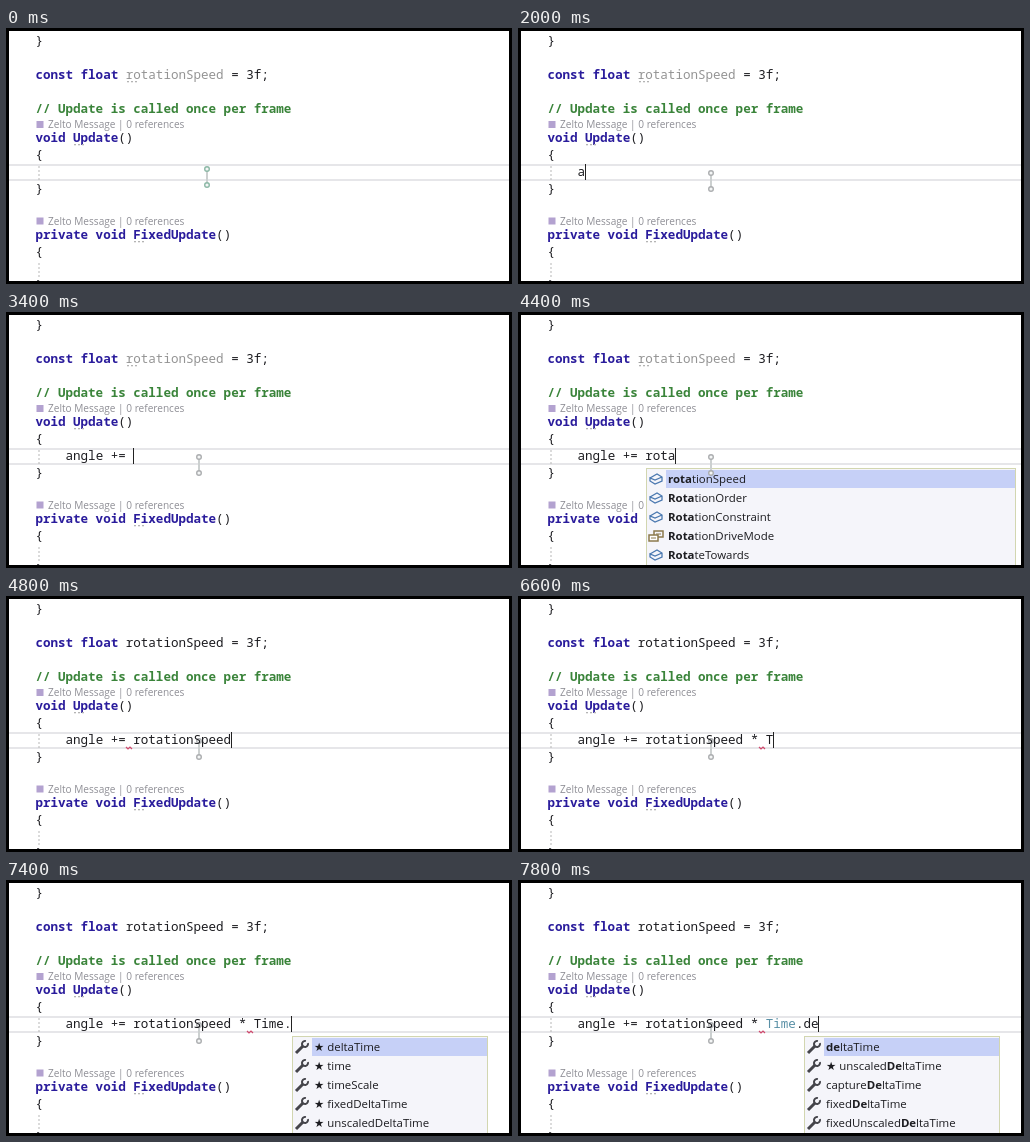
These frames come from a looping animation (506x256 px, 8000 ms). An HTML page with a canvas:

```html
<!DOCTYPE html>
<html lang="en">
<head>
<meta charset="utf-8">
<title>Typing code</title>
<style>
html, body { margin: 0; width: 100%; height: 100%; overflow: hidden; background: #fff; }
canvas { display: block; width: 506px; height: 256px; }
</style>
</head>
<body>
<canvas id="stage" width="506" height="256"></canvas>
<script>
const ctx = document.getElementById('stage').getContext('2d');
const LOOP = 8000, TICK = 200;
const LEFT = 29.4, CHAR = 7.53, INDENT = LEFT + 4 * CHAR;
const CODE = '12.55px "Noto Sans Mono", "DejaVu Sans Mono", monospace';
const UI = '"Open Sans", "Noto Sans", "DejaVu Sans", sans-serif';
const BLUE = '#2a1c9c', BLACK = '#1c1c20', GRAY = '#949494', GREEN = '#3a843a', TEAL = '#5a90a6';

// Completion lists: column of the word, icon, width, entries
const lists = {
  angle: { col: 0, icon: 'field', width: 370, items: ['angle', 'AngleUnit', 'AnchoredJoint2D', 'AnimationClip', 'AnimationCurve'] },
  rotation: { col: 9, icon: 'field', width: 370, items: ['rotationSpeed', 'RotationOrder', 'RotationConstraint', 'RotationDriveMode', 'RotateTowards'] },
  time: { col: 25, icon: 'class', width: 370, items: ['Time', 'TimelinePreferences', 'TimelineProjectSettings', 'ParticleSystemAnimationTimeMode', 'SleepTimeout'] },
  members: { col: 30, icon: 'wrench', width: 196, items: ['★ deltaTime', '★ time', '★ timeScale', '★ fixedDeltaTime', '★ unscaledDeltaTime'] },
  delta: { col: 30, icon: 'wrench', width: 196, items: ['deltaTime', '★ unscaledDeltaTime', 'captureDeltaTime', 'fixedDeltaTime', 'fixedUnscaledDeltaTime'] }
};

// Start time, typed text, open list, caret hidden
const SUM = 'angle += rotationSpeed';
const steps = [
  [0, '', null, true],
  [800, ''],
  [1400, '', null, true],
  [2000, 'a'],
  [2200, 'an', 'angle'],
  [2400, 'ang', 'angle'],
  [2600, 'angl', 'angle'],
  [2800, 'angle'],
  [3200, 'angle +'],
  [3400, 'angle += '],
  [3800, 'angle += r'],
  [4000, 'angle += ro', 'rotation'],
  [4200, 'angle += rot', 'rotation'],
  [4400, 'angle += rota', 'rotation'],
  [4600, 'angle += rotat', 'rotation'],
  [4800, SUM],
  [5000, SUM + ' '],
  [5200, SUM + ' *'],
  [5400, SUM + ' * '],
  [6000, SUM + ' * ', null, true],
  [6600, SUM + ' * T'],
  [6800, SUM + ' * Tim', 'time'],
  [7000, SUM + ' * Time', 'time'],
  [7200, SUM + ' * Time.'],
  [7400, SUM + ' * Time.', 'members'],
  [7600, SUM + ' * Time.d', 'delta'],
  [7800, SUM + ' * Time.de', 'delta']
];

function text(str, x, y, color, font) {
  ctx.font = font;
  ctx.fillStyle = color;
  ctx.fillText(str, x, y);
  return x + ctx.measureText(str).width;
}

// Coloured pieces on the character grid; keywords and comments look heavier
function code(y, x, ...parts) {
  for (const [str, color] of parts) {
    const weight = color === BLUE || color === GREEN ? 600 : 500;
    text(str, x, y, color, weight + ' ' + CODE);
    x += str.length * CHAR;
  }
}

function rect(x, y, w, h, color) {
  ctx.fillStyle = color;
  ctx.fillRect(x, y, w, h);
}

function path(points, color, width = 1) {
  ctx.beginPath();
  points.forEach(([x, y]) => ctx.lineTo(x, y));
  ctx.strokeStyle = color;
  ctx.lineWidth = width;
  ctx.stroke();
}

function hint(x, y) {
  for (let i = 0; i < 3; i++) rect(x + i * 4, y, 2, 1.3, '#b4b4b4');
}

function lens(y) {
  rect(30.5, y - 7, 7, 7, '#b3a2d0');
  text('Zelto Message | 0 references', 42, y, '#8f8f96', '10.1px ' + UI);
}

function guide(top, bottom) {
  for (let y = top; y < bottom; y += 4) rect(32.5, y, 1, 2, '#b8b8b8');
}

function squiggle(x, color) {
  path([[x, 151], [x + 2, 153], [x + 4, 151], [x + 6, 153]], color, 1.2);
}

function drawPage(t) {
  rect(0, 0, 506, 256, '#fff');
  code(16.5, LEFT, ['}', BLACK]);
  const used = t >= 4800;
  code(51, LEFT, ['const float ', BLUE], ['rotationSpeed', used ? BLACK : GRAY], [' = 3f;', BLACK]);
  if (!used) hint(121, 53);
  code(84.5, LEFT, ['// Update is called once per frame', GREEN]);
  lens(100);
  code(114, LEFT, ['void Update', BLUE], ['()', BLACK]);
  hint(68, 116);
  code(130.5, LEFT, ['{', BLACK]);
  rect(3, 136, 500, 2, '#e6e6e9');
  rect(3, 151, 500, 2, '#e6e6e9');
  guide(138, 151);
  code(164.5, LEFT, ['}', BLACK]);
  lens(196.5);
  code(211, LEFT, ['private void FixedUpdate', BLUE], ['()', BLACK]);
  hint(128, 213);
  code(227.5, LEFT, ['{', BLACK]);
  guide(235, 250);
  code(260.5, LEFT, ['}', BLACK]);
}

const icons = {
  class(x, y) {
    path([[x - 3, y - 6], [x, y - 3], [x - 4, y + 1], [x - 7, y - 2], [x - 3, y - 6]], '#a08a52', 1.6);
    path([[x - 1, y - 2], [x + 4, y - 2]], '#77705f');
    path([[x + 1, y - 2], [x + 1, y + 4], [x + 4, y + 4]], '#77705f');
    for (const dy of [-2, 4]) {
      path([[x + 5, y + dy - 2], [x + 8, y + dy], [x + 5, y + dy + 2], [x + 3, y + dy], [x + 5, y + dy - 2]], '#a08a52', 1.4);
    }
  },
  enum(x, y) {
    ctx.strokeStyle = '#8c7a4c';
    ctx.lineWidth = 1.5;
    ctx.strokeRect(x - 2, y - 5, 9, 6);
    rect(x - 7, y - 1, 9, 6, '#fff');
    ctx.strokeRect(x - 7, y - 1, 9, 6);
    path([[x - 5, y + 2], [x, y + 2]], '#8c7a4c');
    path([[x, y - 2], [x + 5, y - 2]], '#8c7a4c');
  },
  field(x, y) {
    path([[x - 6, y - 1], [x + 1, y - 5], [x + 6, y - 2], [x + 6, y + 2], [x - 1, y + 5], [x - 6, y + 2], [x - 6, y - 1], [x - 1, y + 1], [x + 6, y - 2]], '#4a78b0', 1.3);
  },
  wrench(x, y) {
    path([[x - 6, y + 6], [x + 1, y - 1]], '#44444a', 3);
    ctx.beginPath();
    ctx.arc(x + 3, y - 3, 3, -0.3, Math.PI * 1.5 + 0.3);
    ctx.lineWidth = 2;
    ctx.stroke();
  }
};

function drawEntry(str, typed, x, y) {
  const at = typed ? str.toLowerCase().indexOf(typed.toLowerCase()) : -1;
  const from = Math.max(at, 0), to = at < 0 ? 0 : at + typed.length;
  const normal = '11.45px ' + UI, bold = 'bold ' + normal;
  x = text(str.slice(0, from), x, y, BLACK, normal);
  x = text(str.slice(from, to), x, y, BLACK, bold);
  text(str.slice(to), x, y, BLACK, normal);
}

function drawList({ col, icon, width, items }, line) {
  const x = Math.round(INDENT + col * CHAR) + 1;
  rect(x, 156, width, 100, '#d2d6b0');
  rect(x + 1, 157, width - 2, 99, '#f5f5fa');
  rect(x + 20, 158, width - 21, 18, '#c6d0f7');
  items.forEach((item, i) => {
    const y = 167 + i * 19;
    icons[item.includes('Mode') ? 'enum' : icon](x + 10, y);
    drawEntry(item, line.slice(col), x + 22, y + 4);
  });
}

function drawPointer(t) {
  const p = Math.min(t / 1000, 1);
  const x = 201 - 8 * p, y = 141 + 4 * p;
  path([[x, y + 2], [x, y + 14]], '#ccd0d0', 2);
  for (const cy of [y, y + 16]) {
    ctx.beginPath();
    ctx.arc(x, cy, 2.3, 0, Math.PI * 2);
    ctx.fillStyle = '#f4f6f6';
    ctx.fill();
    ctx.strokeStyle = p < 1 ? '#8cb8a6' : '#acaeb0';
    ctx.lineWidth = 1.4;
    ctx.stroke();
  }
}

function drawLine(t, line, hidden) {
  const type = t >= 7800 ? TEAL : BLACK;
  code(148, INDENT, [line.slice(0, 25), BLACK], [line.slice(25, 29), type], [line.slice(29), BLACK]);
  if (t >= 4800) squiggle(t < 6200 ? 120 : 241, '#d0486c');
  if (!hidden) rect(Math.round(INDENT + line.length * CHAR), 136, 1, 16, '#222');
}

function drawBorder() {
  ctx.strokeStyle = '#000';
  ctx.lineWidth = 3;
  ctx.strokeRect(1.5, 1.5, 503, 253);
}

function draw(now) {
  const t = Math.floor((now % LOOP) / TICK) * TICK;
  const [, line, list, hidden] = steps.filter(s => s[0] <= t).pop();
  drawPage(t);
  if (list) drawList(lists[list], line);
  drawPointer(t);
  drawLine(t, line, hidden);
  drawBorder();
}

const start = performance.now();
function loop() {
  draw(performance.now() - start);
  requestAnimationFrame(loop);
}
loop();
</script>
</body>
</html>
```
